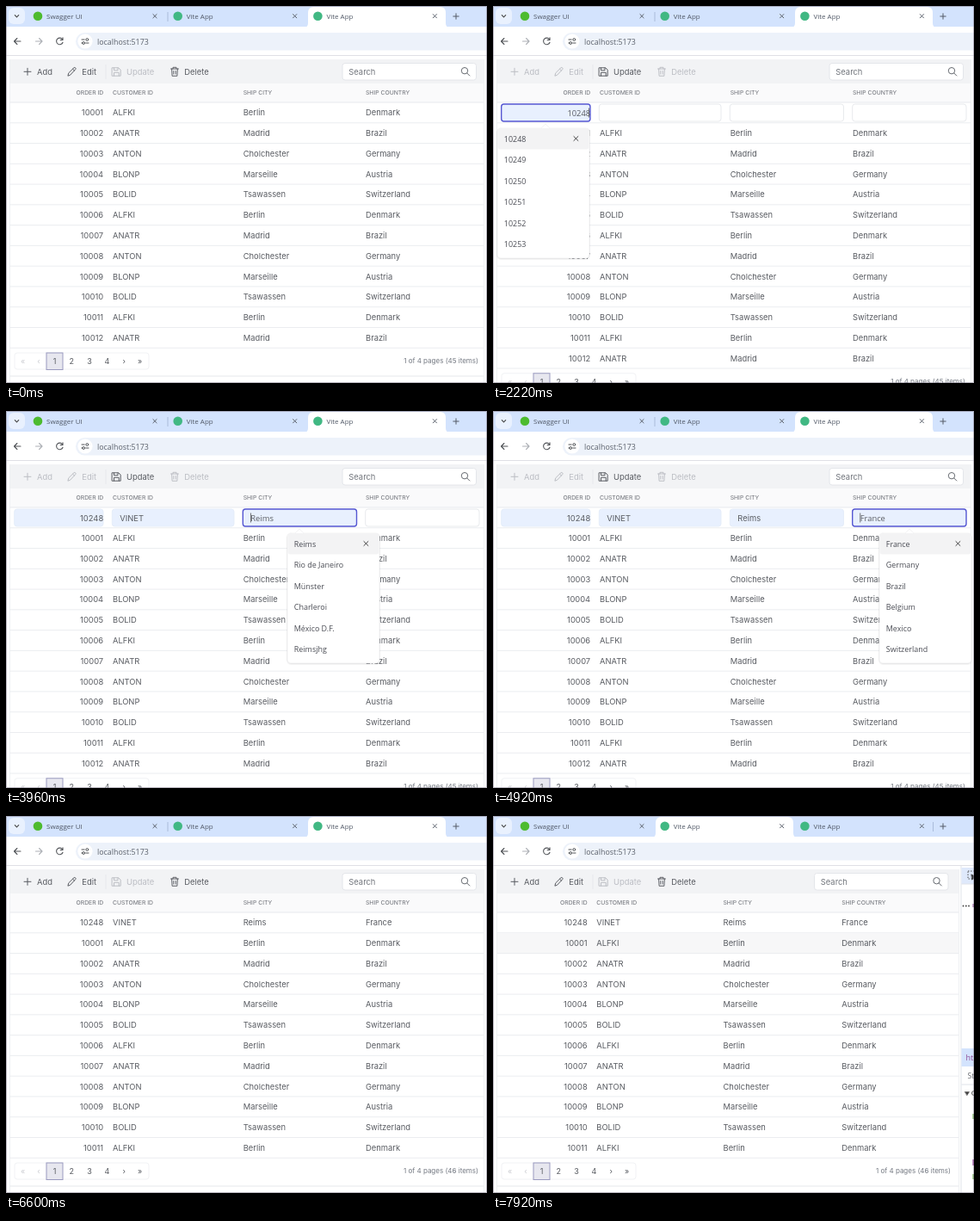
These frames come from a looping animation (559x438 px, 8000 ms). An HTML page:

```html
<!DOCTYPE html>
<html lang="en">
<head>
<meta charset="utf-8">
<title>Data grid</title>
<style>
html, body { margin: 0; width: 559px; height: 438px; overflow: hidden; background: #fff; }
svg { display: block; }
text { font-family: Inter, sans-serif; white-space: pre; }
text.ui { font-family: "Open Sans", "Noto Sans", sans-serif; }
</style>
</head>
<body>
<svg id="stage" width="559" height="438" viewBox="0 0 559 438"></svg>
<script>
const LOOP = 8000;
const ROW = 23.77;
const INK = '#595c62';
const FADED = '#bcbec4';
const ACCENT = '#5557d2';

const WIDE = { right: 555, cols: [113.2, 124, 275.7, 418], search: 391, pager: 549 };
const NARROW = { right: 541, cols: [109.7, 120.3, 267.5, 405.3], search: 373.5, pager: 532 };
const HEADERS = ['ORDER ID', 'CUSTOMER ID', 'SHIP CITY', 'SHIP COUNTRY'];
const ORDERS = [
  ['ALFKI', 'Berlin', 'Denmark'],
  ['ANATR', 'Madrid', 'Brazil'],
  ['ANTON', 'Cholchester', 'Germany'],
  ['BLONP', 'Marseille', 'Austria'],
  ['BOLID', 'Tsawassen', 'Switzerland']
];

// Each field of the new row: its box, suggestion list and moments of change.
const FIELDS = [
  { x: 9.7, w: 103.3, popup: 5, tip: 61, open: 1740, hover: 2040, preview: 2040, pick: 2400,
    list: ['10248', '10249', '10250', '10251', '10252', '10253'] },
  { x: 123.3, w: 141.7, popup: 180, tip: 194, open: 2820, hover: 3060, preview: 3120, pick: 3300,
    list: ['VINET', 'TOMSP', 'VICTE', 'ALFKI', 'SUPRD', 'VINETzz'] },
  { x: 275.3, w: 132.2, popup: 327, tip: 341, open: 3720, hover: 3960, preview: 3960, pick: 4200,
    list: ['Reims', 'Rio de Janeiro', 'Münster', 'Charleroi', 'México D.F.', 'Reimsjhg'] },
  { x: 417.7, w: 132.3, popup: 449, tip: 484, open: 4680, hover: 4860, preview: 4860, pick: 5160,
    list: ['France', 'Germany', 'Brazil', 'Belgium', 'Mexico', 'Switzerland'] }
];
const TIMES = { addHover: 900, edit: 1080, blinkOff: 1500, blinkOn: 1740,
  updateHover: 6060, saved: 6300, rowHover: 7020, switchTab: 7260 };

const rect = (x, y, w, h, fill, extra = '') =>
  `<rect x="${x}" y="${y}" width="${w}" height="${h}" fill="${fill}" ${extra}/>`;
const path = (d, color, width = 1, fill = 'none') =>
  `<path d="${d}" fill="${fill}" stroke="${color}" stroke-width="${width}" stroke-linecap="round" stroke-linejoin="round"/>`;
const hline = (x1, x2, y, color) => rect(x1, y - 0.5, x2 - x1, 1, color);
const circle = (x, y, r, fill) => `<circle cx="${x}" cy="${y}" r="${r}" fill="${fill}"/>`;
const ring = (x, y, r, color) => `<circle cx="${x}" cy="${y}" r="${r}" fill="none" stroke="${color}"/>`;
// The y of a text is the middle of its capitals.
const text = (s, x, y, { size = 9.4, color = INK, anchor = 'start', ui = false } = {}) =>
  `<text x="${x}" y="${y + size * 0.36}" text-anchor="${anchor}" class="${ui ? 'ui' : ''}" style="font-size:${size}px;fill:${color}">${s}</text>`;
const cross = (x, y, r, color) =>
  path(`M${x - r} ${y - r}l${2 * r} ${2 * r}m0 ${-2 * r}l${-2 * r} ${2 * r}`, color);

function browser(active) {
  const left = active === 1 ? 189 : 351;
  let out = rect(0, 0, 559, 25, '#d3e3fd') + rect(0, 24, 559, 34, '#fff');
  out += rect(3, 2, 19, 19, '#e9f1fe', 'rx="6"') + path('M10.3 10.7l2.2 2.2 2.2-2.2', '#444', 1.1);
  out += path(`M${left - 5} 25q5 0 5-5V8q0-7 7-7h146q7 0 7 7v12q0 5 5 5z`, 'none', 0, '#fff');
  out += rect(active === 1 ? 511 : 187.5, 7, 1, 11, '#aabcda');
  ['Swagger UI', 'Vite App', 'Vite App'].forEach((title, i) => {
    const x = 47 + i * 162.7;
    out += circle(x - 10, 11.7, 5.3, i ? '#41b883' : '#4dbb2f');
    out += text(title, x, 12, { size: 8, color: '#505866', ui: true });
    out += cross(x + 126, 11.7, 2.1, '#5a606b');
  });
  out += path('M519.8 12h6.4M523 8.8v6.4', '#555b66');

  out += path('M17 41h-7.5m3.4-3.5L9.5 41l3.4 3.5', '#505357', 1.1);
  out += path('M34.5 41H42m-3.4-3.5L42 41l-3.4 3.5', '#adb0b5', 1.1);
  out += path('M65.7 39a3.8 3.8 0 1 0 .3 3.2M66 36.8v2.7h-2.8', '#505357', 1.1);
  out += rect(81, 31, 500, 20.5, '#edf2fa', 'rx="10.2"') + circle(92, 41, 8.6, '#fff');
  out += path('M88 39h3.2M88 43h1M92.8 43H96', '#505357');
  out += ring(94.3, 39, 1.4, '#505357') + ring(90.2, 43, 1.4, '#505357');
  out += text('localhost:5173', 106, 41.3, { size: 8.9, color: '#5c626c', ui: true });
  return out + hline(0, 559, 57.5, '#e0e0e5');
}

function toolbar(s) {
  const { right, search } = s.layout;
  const on = s.editing ? FADED : INK;
  const save = s.editing ? INK : FADED;
  let out = rect(4.5, 62, right - 4.5, 28, '#f2f3f5');
  if (s.addHover) out += rect(13, 66, 47, 21, '#e4e6ea', 'rx="3"');
  if (s.updateHover) out += rect(117, 66, 61, 21, '#e4e6ea', 'rx="3"');
  out += path('M21 76.3h8M25 72.3v8', on) + text('Add', 36, 76.3, { color: on });
  out += path('M72 80.8l.8-3 6.2-6.1q.8-.7 1.7.2.8.8.1 1.6L74.8 80zM77.6 73.2l2 2', on);
  out += text('Edit', 88.3, 76.3, { color: on });
  out += rect(115.5, 68, 1, 17, '#e6e8eb');
  out += path('M123.5 71.8h7.3l2.4 2.4v7h-9.7zM125.5 72v2.8h4.5V72M125.5 81v-3.7h5.7V81', save);
  out += text('Update', 140, 76.3, { color: save });
  out += path('M191.5 73h9M194 73v-1.7h4V73M192.6 73l.5 8.3h5.8l.5-8.3M194.8 75.5v3.5M197.2 75.5v3.5', on, 0.95);
  out += text('Delete', 207.3, 76.3, { color: on });
  out += rect(search, 66.5, 155.5, 19.5, '#fff', 'rx="3" stroke="#e4e6ea"');
  out += text('Search', search + 7.3, 76.4, { color: '#72767d' });
  const lens = search + 142;
  return out + ring(lens, 75.2, 3.7, '#666a70') + path(`M${lens + 2.8} 78l3 3`, '#666a70');
}

function rows(s) {
  const { cols, right } = s.layout;
  const data = Array.from({ length: 12 }, (_, i) => [10001 + i, ...ORDERS[i % 5]]);
  if (s.saved) {
    data.unshift([10248, 'VINET', 'Reims', 'France']);
    data.pop();
  }
  let out = rect(4.5, 90, right - 4.5, 22, '#fafafb');
  HEADERS.forEach((h, i) => {
    out += text(h, cols[i], 100.6, { size: 6.8, color: '#6b6e75', anchor: i ? 'start' : 'end' });
  });
  out += hline(4.5, right, 112, '#e8eaed');
  data.forEach((row, i) => {
    const top = 112 + (i + s.editing) * ROW;
    if (s.hoverRow === i) out += rect(4.5, top + 0.5, right - 4.5, ROW - 1, '#f7f7f8');
    row.forEach((value, c) => {
      out += text(value, cols[c], top + 12, { anchor: c ? 'start' : 'end' });
    });
    out += hline(4.5, right, top + ROW, '#ebedf0');
  });
  return out;
}

function pager(s) {
  const y = 412.5 + s.editing * ROW;
  const { right, pager: end } = s.layout;
  let out = rect(10, y - 9.5, 156, 19, '#fff', 'rx="3" stroke="#f1f2f5"');
  out += rect(47, y - 9.5, 19, 19.5, '#e7e7ef', 'stroke="#9a9abf"');
  ['«', '‹', '1', '2', '3', '4', '›', '»'].forEach((mark, i) => {
    const x = [19.5, 38, 56.5, 76.3, 97, 117.5, 137.3, 155.5][i];
    out += text(mark, x, y, { size: 9, anchor: 'middle', color: i < 2 ? '#cccdd2' : INK });
  });
  out += text(`1 of 4 pages (${s.saved ? 46 : 45} items)`, end, y, { size: 8, color: '#747982', anchor: 'end' });
  return out + hline(4.5, right, y + 17.5, '#e6e8eb');
}

function editRow(t) {
  let out = hline(4.5, 555, 112 + ROW, '#ebedf0');
  const current = FIELDS.reduce((last, f, i) => (t >= f.open ? i : last), 0);
  FIELDS.forEach((f, i) => {
    const focused = i === current;
    const filled = t >= f.preview;
    const picked = t >= f.pick;
    const stroke = focused ? ACCENT : picked ? '#e5edf9' : '#e8eaed';
    out += rect(f.x, 114, f.w, 20, filled ? '#e8f0fe' : '#fff', `rx="3" stroke="${stroke}" stroke-width="${focused ? 1.4 : 1}"`);
    const x = i ? f.x + 9 : 113.2;
    if (filled) out += text(f.list[0], x, 124.2, { anchor: i ? 'start' : 'end', ui: !picked });
    const blink = t >= TIMES.blinkOff && t < TIMES.blinkOn;
    if (focused && !picked && !blink) out += rect(i ? x - 0.3 : 111, 118.5, 0.8, 11, '#555');
  });
  return out;
}

function suggestions(t) {
  const f = FIELDS.find(f => t >= f.open && t < f.pick);
  if (!f) return '';
  const x = f.popup;
  let out = rect(x - 1, 142, 109, 153, '#000', 'rx="5" opacity=".04"') + rect(x - 0.5, 142, 108, 152, '#000', 'rx="5" opacity=".06"');
  out += path(`M${x + 4} 142H${f.tip - 5}l5-5 5 5H${x + 103}q4 0 4 4V289q0 4-4 4H${x + 4}q-4 0-4-4V146q0-4 4-4z`, '#ebebed', 0.6, '#fff');
  if (t >= f.hover) {
    out += rect(x + 0.5, 142, 106, 24.5, '#f3f3f4', 'rx="3"') + cross(x + 91.4, 154, 2.5, '#444');
  }
  f.list.forEach((item, i) => {
    out += text(item, x + 7.8, 154.3 + i * 24.5, { size: 8.95, color: '#4a4c54', ui: true });
  });
  return out;
}

function sidePanel() {
  let out = rect(544, 58, 15, 380, '#fff') + rect(543.5, 58, 1, 380, '#e0e3ea');
  out += rect(544.5, 60, 15, 19, '#dfe9fb');
  out += rect(552, 64, 10, 9, 'none', 'stroke="#555" stroke-dasharray="1.5 1.5"');
  out += path('M556 68l5 2-4 4z', '#333', 0.6, '#333');
  out += hline(544.5, 559, 79, '#e0e3ea');
  for (const x of [546.5, 549.8, 553]) out += circle(x, 104.5, 0.9, '#444');
  out += rect(557.5, 102, 1.5, 4, '#9a5a9e');
  out += rect(544.5, 270, 15, 21, '#d3e3fd') + text('ht', 549.5, 280.5, { size: 9, color: '#8f4b96', ui: true });
  out += text('St', 551.5, 302, { size: 8.5, color: '#6a6d72', ui: true });
  out += hline(544.5, 559, 312, '#e0e3ea') + path('M548.5 320.5h5l-2.5 4z', '#444', 0.5, '#444');
  out += ring(559, 322, 2.5, '#555');
  out += rect(557.5, 346, 2, 6, '#6cae4b') + rect(557.5, 399, 2, 7, '#8a2b8f');
  return out + rect(557.5, 416, 2, 6, '#6cae4b');
}

function scene(t) {
  const editing = t >= TIMES.edit && t < TIMES.saved;
  const second = t >= TIMES.switchTab;
  const s = {
    editing,
    saved: t >= TIMES.saved,
    layout: second ? NARROW : WIDE,
    addHover: t >= TIMES.addHover && t < TIMES.edit,
    updateHover: t >= TIMES.updateHover && t < TIMES.saved,
    hoverRow: t >= TIMES.rowHover ? 1 : -1
  };
  let out = rect(0, 0, 559, 438, '#fff') + browser(second ? 1 : 2) + rows(s) + toolbar(s) + pager(s);
  out += rect(4, 62, 0.8, 376, '#eceef1') + rect(s.layout.right, 62, 0.8, 376, '#eceef1');
  if (editing) out += editRow(t) + suggestions(t);
  if (second) out += sidePanel();
  return out + rect(0.5, 0.5, 558, 437, 'none', 'stroke="#8d8797" stroke-opacity=".6"');
}

const stage = document.getElementById('stage');
const start = performance.now();
let shown = '';
function frame() {
  const picture = scene((performance.now() - start) % LOOP);
  if (picture !== shown) stage.innerHTML = shown = picture;
  requestAnimationFrame(frame);
}
frame();
</script>
</body>
</html>
```
